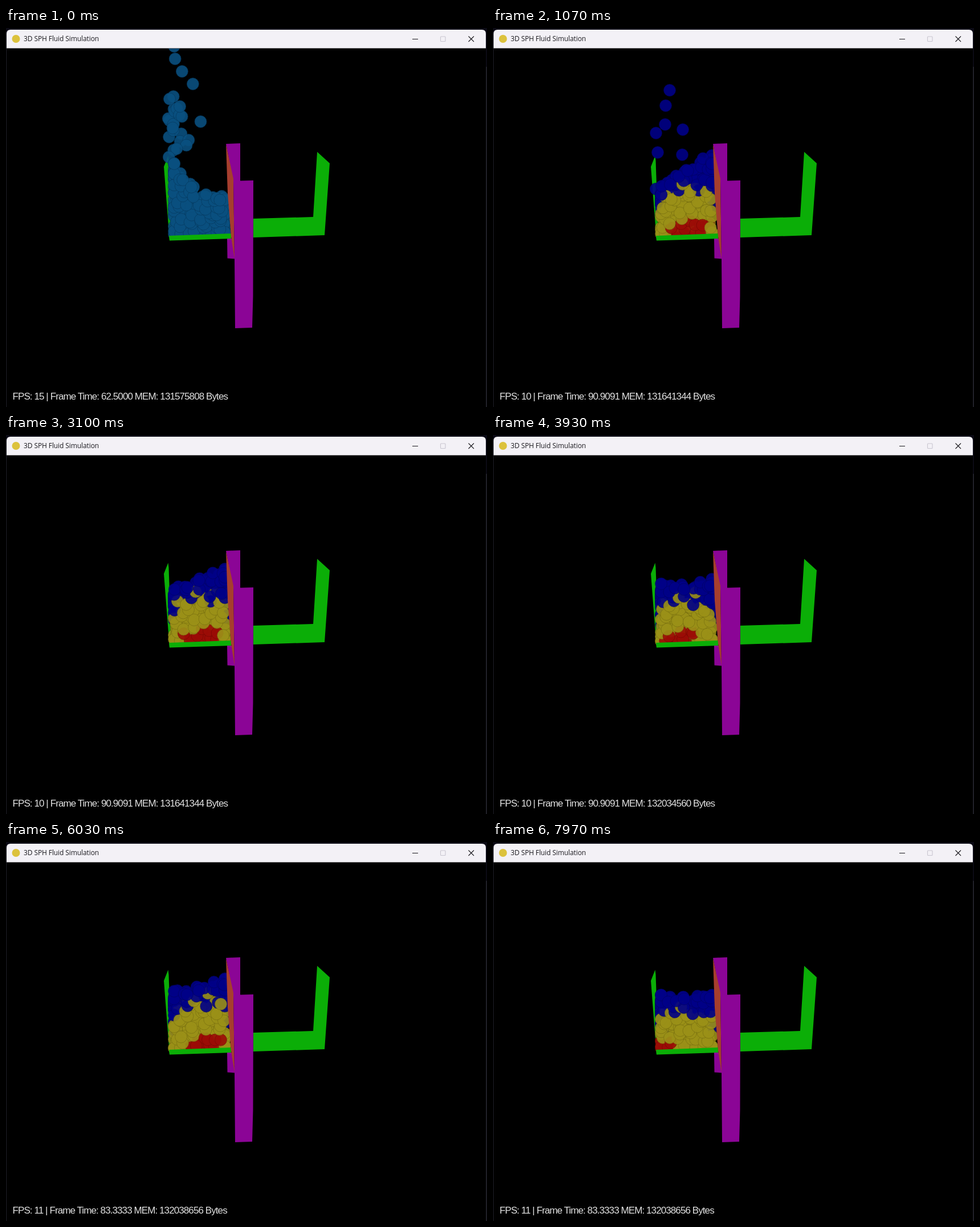
Recreate the animation shown at these times as an HTML page. Size 844 px wide and 664 px high, loop 8000 ms.

```html
<!DOCTYPE html>
<html lang="en">
<head>
<meta charset="utf-8">
<title>3D SPH Fluid Simulation</title>
<style>
  html, body { margin: 0; width: 100%; height: 100%; overflow: hidden; background: #0b0a14; }
  svg { display: block; width: 844px; height: 664px; }
  .title { font: 12px "Open Sans", "Noto Sans", sans-serif; fill: #1b1a1f; letter-spacing: -.1px; }
  .stats { font: 17px "Liberation Sans", Arial, sans-serif; fill: #e2e2e2; letter-spacing: -.91px; }
  .green { fill: #0bae07; }
  .purple { fill: #8b0596; }
</style>
</head>
<body>
<svg viewBox="0 0 844 664">
  <rect width="844" height="664" fill="#0b0a14"/>
  <path d="M0 36V664M843 68V664" stroke="#34343a"/>
  <rect x="1" y="35" width="841" height="629"/>
  <path d="M1 35.500V10Q1 3 8 3H835Q842 3 842 10V35.500Z" fill="#f3f1f6"/>
  <circle cx="17.5" cy="19" r="7" fill="#dcc23c"/>
  <text class="title" x="31" y="23.3">3D SPH Fluid Simulation</text>
  <g fill="none" stroke="#1b1a1f" stroke-width="1.1">
    <path d="M713 19.5H723M811.500 14.500L821 24M821 14.500L811.500 24"/>
    <rect x="762.500" y="15" width="8.500" height="8.500" rx="1" stroke="#c9c6d0"/>
  </g>

  <clipPath id="view"><rect x="1" y="36" width="841" height="628"/></clipPath>
  <g clip-path="url(#view)">
    <path class="green" d="M546 217L568 237L559 363L434 367V334L539 331Z"/>
    <path class="green" d="M284.500 224L277 243L287 372.500L290 365L285.500 232Z"/>
    <g id="fluid"></g>
    <path class="green" d="M286 364L395 360V369L287 372.500Z"/>
    <path class="purple" d="M388 369H396L402 404.500L388.500 403.500Z"/>
    <path class="purple" d="M386 203L411 202V270H399Z"/>
    <path fill="#a63e2e" d="M386 204L399 264L401 404L395 366L389 290Z"/>
    <path class="purple" d="M399 268L434 267L433.500 470L432 525L402 526L401 404Z"/>
  </g>
  <text class="stats" id="stats" x="11.5" y="651"></text>
</svg>
<script>
const LOOP = 8000, STEP = 40;
const LEFT = 295, WIDTH = 89, FLOOR = 361, RADIUS = 10.5, GRAVITY = 500;
const COLOR_AT = 0.9, FPS_DROP = 0.5, SETTLED = 5.45;

// the highest drops: where they are at AIR_TIME
const AIR_TIME = 1.07;
const AIRBORNE = [[310, 109], [303, 136], [302, 169], [333, 178], [286, 184], [289, 218], [332, 222]];

const PAINT = {
  plain: ["#0a5080", "#07395c"],
  low: ["#000088", "#000060"],
  mid: ["#9b9118", "#756c10"],
  high: ["#9c0c06", "#720804"]
};

let seed = 7;
const rand = () => (seed = (seed * 16807) % 2147483647) / 2147483647;
const spread = size => (rand() - .5) * size;
const clamp = (x, a, b) => Math.max(a, Math.min(b, x));
const make = (count, build) => Array.from({ length: count }, (_, i) => build(i));
const fluid = document.getElementById("fluid");
const stats = document.getElementById("stats");

function disc() {
  const el = document.createElementNS("http://www.w3.org/2000/svg", "circle");
  el.setAttribute("r", RADIUS);
  el.setAttribute("stroke-width", .7);
  el.setAttribute("opacity", .9);
  return fluid.appendChild(el);
}

function place(el, x, y, kind) {
  const [fill, stroke] = PAINT[kind];
  el.setAttribute("cx", x.toFixed(1));
  el.setAttribute("cy", y.toFixed(1));
  el.setAttribute("fill", fill);
  el.setAttribute("stroke", stroke);
}

// a ballistic drop that passes through both points
const drop = (x, y, x1, y1) => ({
  el: disc(), x, y,
  vx: (x1 - x) / AIR_TIME,
  vy: (y1 - y) / AIR_TIME - GRAVITY * AIR_TIME / 2,
  sink: 4 + rand() * 25
});

const drops = [
  ...AIRBORNE.map(([x, y], i) => drop(Math.max(281, x + spread(30)), 32 + i * 22, x, y)),
  ...make(20, () => {
    const x = 284 + 40 * rand() ** 1.4;
    return drop(x, 100 + 145 * rand() ** .7, x, 275 + rand() * 90);
  })
];

const jets = make(9, i => ({ el: disc(), x: 302 + i * 4.6, y: 251 + spread(8), sink: 4 + rand() * 20 }));

// three layers of 8 rows and 7 columns, back to front
const pool = make(168, i => ({
  el: disc(),
  u: (i % 7 + spread(.9)) / 6,
  v: (Math.floor(i / 7) % 8 + spread(.9)) / 7,
  limit: .55 + rand() * .4,
  heat: .1 + rand() * .12,
  phase: rand() * 2 * Math.PI,
  rate: 1.5 + rand() * 2
}));

// slowing, damped slosh: wave is 1 when the left side is high, -1 when the right is
function sloshAt(s) {
  const wave = Math.cos(Math.PI * (s - .03 * s * s));
  const tilt = 28 * wave * (1 - s / 8) ** .8;
  const level = 264 + 7 * wave, sag = 6 + tilt / 2;
  const surface = x => {
    const u = clamp((x - LEFT) / WIDTH, 0, 1);
    return level - tilt * (1 - 2 * u) + sag * 4 * u * (1 - u);
  };
  return { surface, lean: -tilt / 30, redX: 325 - 20 * wave, redW: 25 - 9 * wave };
}

function drawStats(s) {
  const fps = s < FPS_DROP ? 15 : s < SETTLED ? 10 : 11;
  const pages = s < COLOR_AT ? 0 : s < 3.7 ? 16 : s < SETTLED ? 112 : 113;
  const frame = (1000 / (fps + 1)).toFixed(4);
  stats.textContent = `FPS: ${fps} | Frame Time: ${frame} MEM: ${131575808 + pages * 4096} Bytes`;
}

function draw(s) {
  const colored = s >= COLOR_AT, top = colored ? "low" : "plain";
  const { surface, lean, redX, redW } = sloshAt(s);

  for (const p of pool) {
    const angle = s * p.rate + p.phase;
    const u = clamp(p.u + lean * .07 * p.v + Math.sin(angle) * .035, 0, 1);
    const v = clamp(p.v + Math.cos(angle) * .03, 0, 1.05);
    const x = LEFT + u * WIDTH;
    const y = FLOOR - u * 3 - v * (FLOOR - surface(x));
    const edge = u < .06 || u > .93 ? .3 : 0;
    const hot = v < p.heat && Math.abs(x - redX) < redW;
    place(p.el, x, y, !colored ? "plain" : v > p.limit - edge ? "low" : hot ? "high" : "mid");
  }

  for (const d of drops) {
    const x = d.x + d.vx * Math.min(s, 1.5);
    const y = d.y + d.vy * s + GRAVITY * s * s / 2;
    const rest = surface(x) + d.sink;
    place(d.el, y < rest ? x : clamp(x, LEFT, LEFT + WIDTH), Math.min(y, rest), top);
  }

  const dt = s - 2.07;
  for (const j of jets) {
    const x = clamp(j.x + dt * 25, LEFT, LEFT + WIDTH);
    place(j.el, x, Math.min(j.y + GRAVITY * dt * dt / 2, surface(x) + j.sink), top);
  }

  drawStats(s);
}

let start, shown;
function tick(now) {
  start ??= now;
  const t = (now - start) % LOOP;
  const ms = Math.max(0, Math.floor((t - 30) / STEP) * STEP + 30);
  if (ms !== shown) draw((shown = ms) / 1000);
  requestAnimationFrame(tick);
}
draw(0);
requestAnimationFrame(tick);
</script>
</body>
</html>
```
